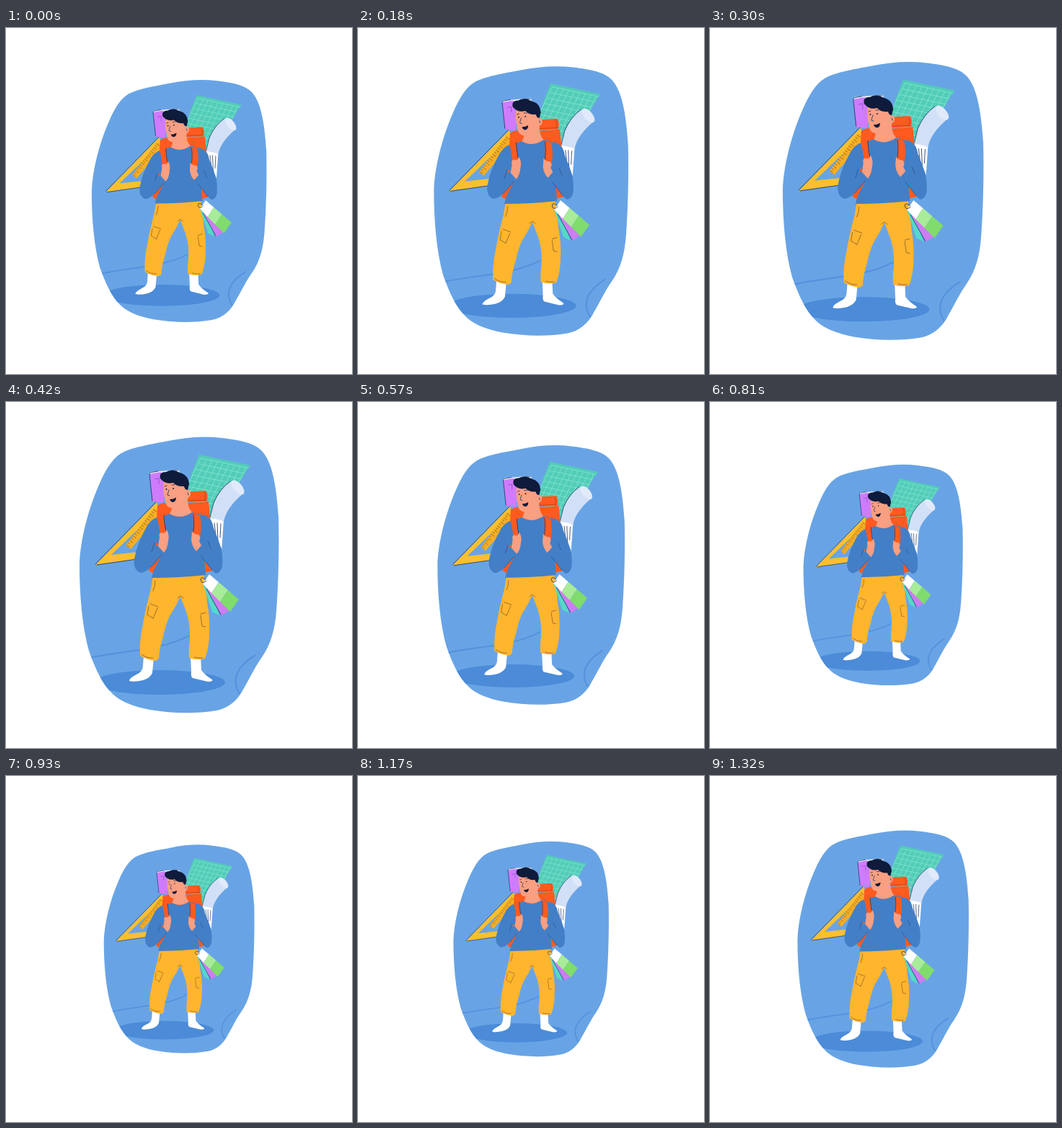
These frames come from a looping animation (480x480 px, 1.35 s). An HTML page:

```html
<!DOCTYPE html>
<html lang="en">
<head>
<meta charset="utf-8">
<title>Backpacker</title>
<style>
  html, body { margin: 0; width: 100%; height: 100%; overflow: hidden; background: #fff; }
  svg { display: block; width: 100%; height: 100%; }
  .ink { fill: none; stroke: #1d3564; stroke-width: .85; stroke-linecap: round; stroke-linejoin: round; }
  .seam { stroke: #8d6128; }
  .fold { stroke: #2c5690; }
  .ground { fill: none; stroke: #5492dd; stroke-width: 2.2; }
  .skin { fill: #f99f82; }
  .shirt { fill: #437fc6; }
  .pack { fill: #ff5a1f; }
  .white { fill: #fff; }
  .dark { fill: #0e1b3a; }
</style>
</head>
<body>
<svg viewBox="0 0 480 480">
  <defs>
    <path id="blob" d="M160 71C176 62 205 58 225 54C250 49 275 47 300 50C325 53 345 57 355 68C369 83 375 114 378 160C379 200 378 250 375 290C373 315 368 335 355 354C345 368 340 380 330 397C322 414 308 425 292 428C262 433 230 432 200 427C178 423 160 416 149 406C133 391 124 370 115 345C106 312 102 270 102 225C103 192 114 149 129 115C138 94 147 79 160 71Z"/>
    <path id="mat" d="M268 73L339 88Q326 104 318 126L284 158L249 128Q257 98 268 73Z"/>
    <clipPath id="blobClip"><use href="#blob"/></clipPath>
    <clipPath id="matClip"><use href="#mat"/></clipPath>
  </defs>

  <g id="scene">
    <use href="#blob" fill="#68a4e5"/>
    <g clip-path="url(#blobClip)">
      <path class="ground" d="M108 357C150 345 212 347 254 324"/>
      <path class="ground" d="M346 351C322 366 311 384 324 405"/>
      <ellipse cx="213" cy="389" rx="91" ry="17" fill="#4b8bd8"/>
    </g>

    <!-- Cutting mat -->
    <use href="#mat" fill="#52cdb7"/>
    <g clip-path="url(#matClip)">
      <path id="grid" transform="matrix(.71 .15 -.32 .65 268 73)" fill="none" stroke="#80e2d0" stroke-width="1.2"/>
    </g>

    <!-- Paper roll and sheets -->
    <path class="white" d="M281 160L302 164L299 207L286 192Z"/>
    <path class="ink" d="M289 168L291 186M293 168L294 194M298 169L297 188"/>
    <path d="M312 110Q297 120 289 138Q284 152 283 162Q292 161 302 166Q305 147 330 126Z" fill="#d2e0f7"/>
    <ellipse cx="321.500" cy="118.500" rx="6" ry="12" transform="rotate(-40 321.500 118.500)" fill="#e0eafb"/>
    <path class="ink" d="M311 110Q296 121 288 140L283 160"/>

    <!-- Notebook -->
    <path d="M200 97L240 94L242 104L202 108Z" fill="#eef2fb"/>
    <path class="ink" d="M200 98L211 96M230 95L239 95"/>
    <path d="M199 100L215 97L220 118L218 140L203 138Z" fill="#ce7cfd"/>
    <path d="M206 107L212 106L212 114" fill="none" stroke="#9a55cf"/>
    <path class="ink" d="M199 100L203 137"/>

    <!-- Set square and ruler -->
    <path d="M124 226L209 139L215 160L189 217ZM146 212L184 208L190 170Z" fill="#fbbf2f" fill-rule="evenodd"/>
    <path class="ink" d="M124 225L208 139M126 226L182 218"/>
    <path d="M166 199L173 204L215 155L206 147Z" fill="#f6ae22"/>
    <path id="ticks" class="ink seam" stroke-linecap="butt"/>

    <!-- Backpack -->
    <path class="pack" d="M210 144Q218 137 230 142L281 138L284 170L290 233L270 238L205 238L198 234L209 165Z"/>
    <path class="pack" d="M246 125L277 123Q282 130 278 138L246 139Z"/>
    <path d="M250 137L279 136M275 125Q278 130 276 135" fill="none" stroke="#b83d18" stroke-width=".8"/>

    <!-- Socks and trousers -->
    <path class="white" d="M191 352L205 354L203 376Q200 383 190 386Q178 389 171 387Q171 383 181 378Q190 374 190 366Z"/>
    <path class="white" d="M256 352L270 352L271 372Q276 379 286 385Q288 388 280 388L259 383Q256 381 257 374Z"/>
    <path d="M204 241L274 238Q278 258 279 278Q283 300 282 320Q282 340 276 356Q264 359 254 355Q253 344 255 330Q256 308 250 291L242 270Q236 283 227 297Q221 310 218 326Q213 340 212 356L208 359Q196 358 186 352Q185 330 190 308Q193 290 197 275Q202 258 204 241Z" fill="#ffb52e"/>
    <path class="ink seam" d="M207 248Q207 256 204 262M238 272L242 269L246 272M200 280L211 284M198 283L196 295L204 300M210 286L204 300M270 294L277 292M270 296L272 311L277 312M188 350Q196 356 204 355M261 354Q267 356 273 355"/>

    <!-- Colour swatches -->
    <path d="M273 252L280 250L296 296L286 291Z" fill="#55d9c6"/>
    <path d="M275 252L284 248L310 289L299 296Z" fill="#cc7df2"/>
    <path class="white" d="M282 239L295 250L285 265L273 252Z"/>
    <path d="M295 250L308 261L297 277L285 265Z" fill="#a8ec99"/>
    <path d="M308 261L323 274L311 291L297 277Z" fill="#7fdc6d"/>
    <path class="ink" d="M278 259L298 295M277 246Q270 241 270 247Q272 254 278 248"/>

    <!-- Jumper -->
    <path class="shirt" d="M227 155Q241 164 258 153Q276 156 285 165L283 196L275 214L277 240Q240 244 202 244L205 233L218 208L205 190Q202 162 227 155Z"/>
    <path class="shirt" d="M212 159Q199 163 193 177Q182 196 178 218Q176 232 186 237Q193 237 201 229L219 209L212 198L207 200L213 176Z"/>
    <path class="shirt" d="M273 156Q286 160 288 175Q294 189 299 204Q301 217 300 228Q298 237 291 238Q284 233 277 221L263 206L270 198L277 201L268 177Z"/>
    <path class="ink fold" d="M206 196L202 208M280 193L284 203M216 212L201 229M270 213L286 233"/>

    <!-- Straps and hands -->
    <path class="pack" d="M209 159L219 156Q220 173 224 188L214 189Q214 175 209 159Z"/>
    <path class="pack" d="M259 154L269 157Q272 172 269 188L258 188Q261 174 259 154Z"/>
    <path class="ink" d="M219 157Q220 173 223 184M260 156Q262 172 259 184"/>
    <path class="skin" d="M213 188Q211 182 216 181Q220 184 223 177Q227 184 225 193Q224 204 219 209L211 200Z"/>
    <path class="skin" d="M258 179Q261 184 267 184Q271 187 268 193L271 199L264 207Q258 201 257 191Z"/>

    <!-- Head -->
    <path class="skin" d="M230 140L252 130Q251 146 258 153Q242 164 227 155Q231 150 230 140Z"/>
    <path class="skin" d="M219 108L247 110L250 122Q257 121 256 129Q254 134 249 133Q245 147 232 147Q222 147 221 138Q217 122 219 108Z"/>
    <path class="dark" d="M214 106Q212 97 222 97Q231 92 241 98Q253 101 254 114L252 122Q248 122 247 117Q237 118 232 112Q221 115 214 106Z"/>
    <path class="ink" d="M226 122L224 129L227 130M220 117L223 116M230 115L234 115M252 126L253 129"/>
    <path class="dark" d="M227 135Q232 135 236 132.500Q236 139 231 139Q228 138 227 135Z"/>
    <circle class="dark" cx="222.500" cy="121" r="1"/>
    <circle class="dark" cx="232" cy="120" r="1"/>
  </g>
</svg>
<script>
  const LOOP = 1350, STEP = 30;
  const scene = document.getElementById('scene');
  const setPath = (id, d) => document.getElementById(id).setAttribute('d', d);
  const repeat = (n, f) => Array.from({ length: n }, (_, i) => f(i)).join('');

  setPath('grid',
    repeat(12, i => `M${6 + i * 11} 6V130`) +
    repeat(10, i => `M6 ${6 + i * 12}H130`));
  setPath('ticks', repeat(17, i => {
    const x = 167 + i * 2.35, y = 198 - i * 3.05, len = i % 2 ? 2.5 : 4;
    return `M${x} ${y}l${len} ${len * 0.75}`;
  }));

  // The whole picture breathes about the stage centre.
  function draw(now) {
    const t = Math.floor((now % LOOP) / STEP) * STEP;
    const scale = 0.878 + 0.132 * Math.sin(2 * Math.PI * t / LOOP);
    scene.setAttribute('transform', `translate(240 240) scale(${scale}) translate(-240 -240)`);
    requestAnimationFrame(draw);
  }
  draw(performance.now());
</script>
</body>
</html>
```
